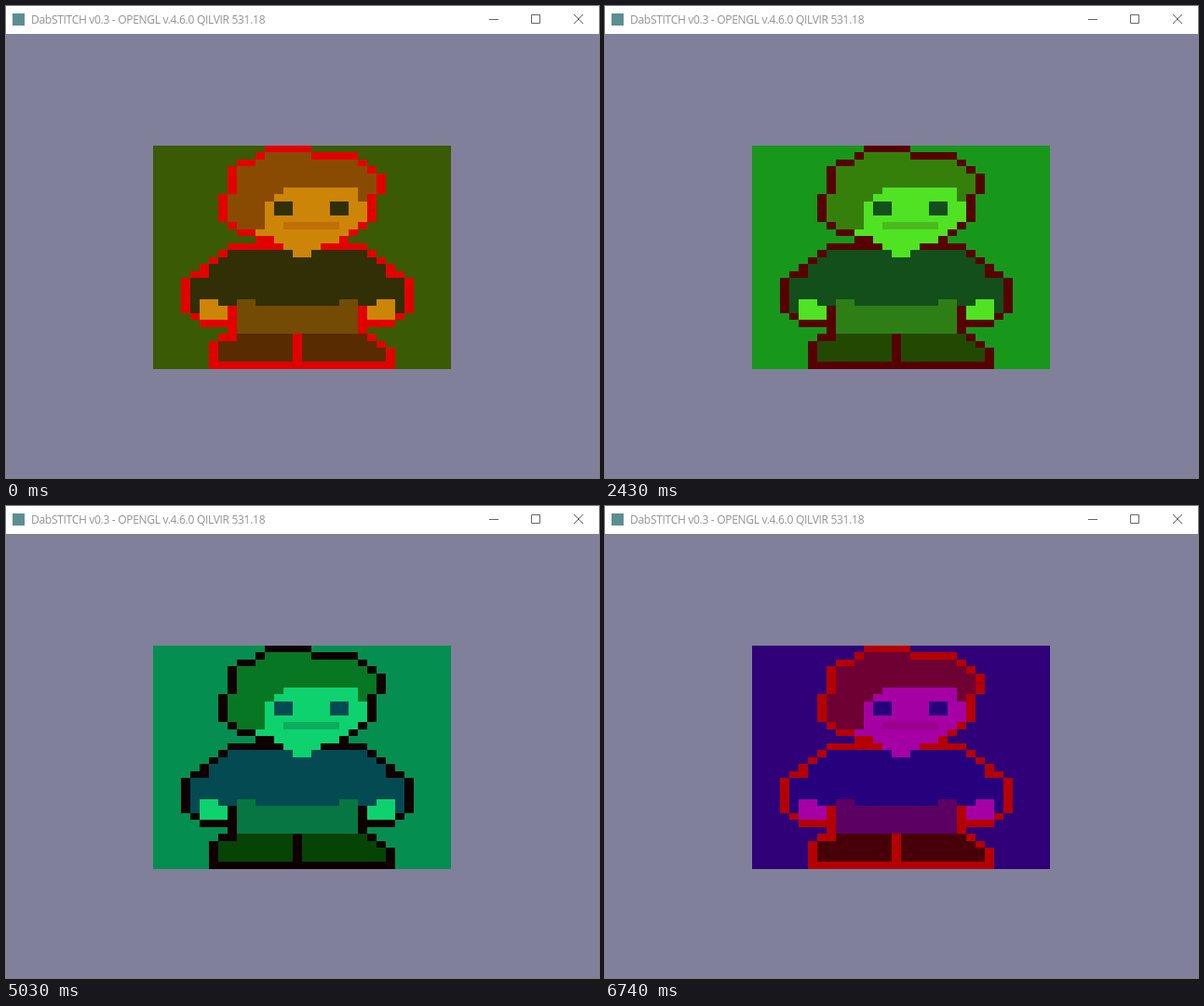
Write an HTML page with a canvas that moves like this. It is 637 px wide and 507 px high and loops after 6.9 s.

```html
<!DOCTYPE html>
<html lang="en">
<head>
<meta charset="utf-8">
<title>Tinted sprite</title>
<style>
  html, body { margin: 0; width: 100%; height: 100%; overflow: hidden; background: #80809a; }
  header { position: absolute; left: 0; top: 0; width: 637px; height: 30px; background: #fff; }
  h1 { position: absolute; left: 27px; top: 0; margin: 0; color: #939393; white-space: pre;
       font: 12px/29px "Open Sans", "Noto Sans", sans-serif; letter-spacing: -.3px; }
  svg { position: absolute; left: 0; top: 0; }
  canvas { position: absolute; left: 158px; top: 150px; }
</style>
</head>
<body>
<header>
  <h1>DabSTITCH v0.3 - OPENGL v.4.6.0 QILVIR 531.18</h1>
  <svg width="637" height="30" fill="none" stroke="#666">
    <rect x="7" y="8" width="13" height="13" fill="#5d8f92" stroke="none"/>
    <path d="M519 14.5h10M564.5 9.5h9v9h-9zM610 9l10 10M620 9l-10 10"/>
  </svg>
</header>
<canvas width="320" height="240"></canvas>
<script>
const ctx = document.querySelector('canvas').getContext('2d');
const LOOP = 6900, STEP = 99;               // ms per loop, ms per picture
const START_ANGLE = -.69, TURN = .2117;     // tint angle, and its change per picture
const CELL_W = 10, CELL_H = 7.5;

const base = {
  sky: [66, 154, 152], line: [255, 0, 0], hair: [155, 129, 66], skin: [232, 229, 208],
  dark: [54, 80, 158], mouth: [217, 188, 177], belt: [131, 128, 126], legs: [100, 74, 9]
};

// Column of an edge at row y, from its corner points [row, column]
function edge(points, y) {
  const i = Math.max(1, points.findIndex(p => p[0] >= y));
  const [y0, x0] = points[i - 1], [y1, x1] = points[i];
  return Math.round(x0 + (x1 - x0) * (y - y0) / (y1 - y0));
}

const mirror = points => points.map(([y, x]) => [y, 30 - x]);

function draw(angle) {
  const tint = [0, 1, 2].map(i => .5 + .5 * Math.cos(angle + i * Math.PI * 2 / 3));

  function rect(name, x, y, w, h = 1) {
    ctx.fillStyle = `rgb(${base[name].map((v, i) => Math.round(v * tint[i]))})`;
    const top = Math.floor(y * CELL_H), bottom = Math.floor((y + h) * CELL_H);
    ctx.fillRect(x * CELL_W, top, w * CELL_W, bottom - top);
  }

  // Fill between two edges; if outlined, cells that touch the outside become line
  function shape(name, left, right, outlined = true) {
    const first = left[0][0], last = left.at(-1)[0];
    const inside = (x, y) => y >= first && y <= last && x >= edge(left, y) && x <= edge(right, y);
    for (let y = first; y <= last; y++)
      for (let x = edge(left, y); x <= edge(right, y); x++) {
        const inner = inside(x - 1, y) && inside(x + 1, y) && inside(x, y - 1) && inside(x, y + 1);
        rect(inner || !outlined ? name : 'line', x, y, 1);
      }
  }

  // The same part on both sides of the body
  function pair(name, x, y, w, h) {
    rect(name, x, y, w, h);
    rect(name, 31 - x - w, y, w, h);
  }

  rect('sky', 0, 0, 32, 32);

  shape('hair', [[0, 12], [3, 8], [6, 8], [7, 7], [10, 7], [12, 9], [13, 11]],
                [[0, 16], [1, 21], [4, 24], [6, 24], [7, 23], [10, 23], [13, 20]]);

  const arm = [[14, 8], [19, 3], [23, 3], [25, 5]];
  shape('dark', arm, mirror(arm));
  pair('line', 4, 18, 2);
  shape('legs', [[26, 8], [28, 6], [31, 6]], [[26, 22], [29, 25], [31, 25]]);
  rect('line', 15, 27, 1, 4);
  rect('line', 8, 27, 1);

  pair('skin', 5, 22, 2);
  pair('skin', 5, 23, 3, 2);
  pair('line', 8, 23, 1, 4);
  pair('belt', 9, 22, 2);
  rect('belt', 9, 23, 13, 4);

  // Face and neck
  shape('skin', [[6, 14], [8, 12], [11, 12], [12, 11], [13, 13], [15, 15]],
                [[6, 21], [7, 21], [8, 22], [10, 22], [13, 19], [14, 17], [15, 16]], false);
  rect('dark', 13, 8, 2, 2);
  rect('dark', 19, 8, 2, 2);
  rect('mouth', 14, 11, 6);
}

const start = performance.now();
function frame() {
  const t = (performance.now() - start) % LOOP;
  draw(START_ANGLE + TURN * Math.floor(t / STEP));
  requestAnimationFrame(frame);
}
frame();
</script>
</body>
</html>
```
